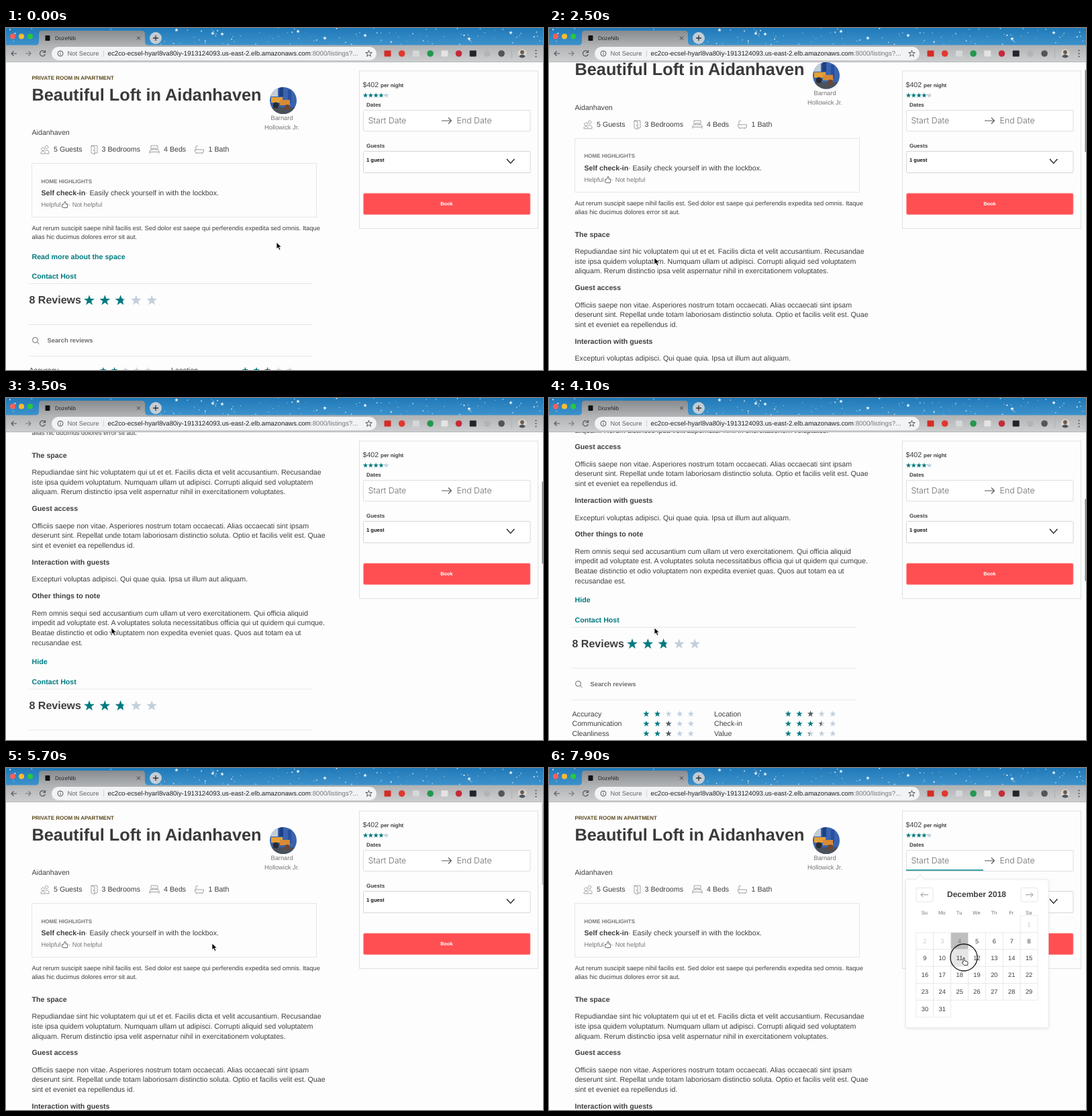
Recreate the animation shown at these times as an HTML page. Size 800 by 509 pixels, loop 8000 ms.

```html
<!DOCTYPE html>
<html lang="en">
<head>
<meta charset="utf-8">
<title>Listing page</title>
<style>
html, body { margin: 0; width: 100%; height: 100%; overflow: hidden; background: #fdfdfd; }
svg { display: block; width: 100%; height: 100%; }
text { font-family: "Liberation Sans", Arial, sans-serif; text-rendering: geometricPrecision; white-space: pre; }
.light { font-family: Inter, "Liberation Sans", sans-serif; font-weight: 300; }
</style>
</head>
<body>
<svg id="stage" viewBox="0 0 800 509"></svg>
<script>
const LOOP = 8000, OPEN_TEXT = 2000, OPEN_CAL = 6700, MORE = 311.7;
const DARK = '#3e3e3e', TEAL = '#007a80', GREY = '#c3cfdb', RULE = '#e4e6e7';

// Text is placed by its optical middle.
const text = (x, y, size, str, fill = DARK, attr = '') =>
  `<text x="${x}" y="${y + size * 0.32}" font-size="${size}" fill="${fill}" ${attr}>${str}</text>`;
const bold = (x, y, size, str, fill = DARK, attr = '') =>
  text(x, y, size, str, fill, 'font-weight="700" ' + attr);
const MID = 'text-anchor="middle"';
const rect = (x, y, w, h, fill, attr = '') =>
  `<rect x="${x}" y="${y}" width="${w}" height="${h}" fill="${fill}" ${attr}/>`;
const circle = (x, y, r, fill, attr = '') =>
  `<circle cx="${x}" cy="${y}" r="${r}" fill="${fill}" ${attr}/>`;
const line = (d, color, width = 1, attr = '') =>
  `<path d="${d}" fill="none" stroke="${color}" stroke-width="${width}" ${attr}/>`;
const rule = y => line(`M34 ${y}H457`, RULE);
const group = (id, body) => `<g id="${id}">${body}</g>`;

function starPath(x, y, r) {
  let d = '';
  for (let i = 0; i < 10; i++) {
    const a = i * Math.PI / 5 - Math.PI / 2, q = i % 2 ? r * 0.4 : r;
    d += (i ? 'L' : 'M') + (x + q * Math.cos(a)).toFixed(2) + ' ' + (y + q * Math.sin(a)).toFixed(2);
  }
  return d + 'Z';
}

let clips = 0;
function stars(x, y, r, step, score, partColor = TEAL) {
  let out = '';
  for (let i = 0; i < 5; i++) {
    const cx = x + i * step, d = starPath(cx, y, r), part = Math.min(1, Math.max(0, score - i));
    out += `<path d="${d}" fill="${part === 1 ? TEAL : GREY}"/>`;
    if (part > 0 && part < 1) {
      const id = 'part' + clips++;
      out += `<clipPath id="${id}">${rect(cx - r, y - r, 2 * r * part, 2 * r, '#000')}</clipPath>` +
        `<path d="${d}" fill="${partColor}" clip-path="url(#${id})"/>`;
    }
  }
  return out;
}

function listing() {
  const icon = d => line(d, '#8b8b8b', 0.8);
  return bold(38.5, 74, 8, 'PRIVATE ROOM IN APARTMENT', '#5c4a1e') +
    bold(38.5, 99.5, 25.3, 'Beautiful Loft in Aidanhaven', '#3a3a3a') +
    '<g clip-path="url(#face)">' +
      rect(393, 88, 40, 40, '#3a64ae') + rect(393, 88, 12, 14, '#c3cdd6') + rect(407, 88, 6, 14, '#1f3f85') +
      rect(420, 92, 5, 20, '#274f9f') + rect(393, 118, 40, 10, '#4b515a') +
      rect(395, 103, 17, 8, '#e6a036') + rect(408, 107, 15, 8, '#d98a35') +
      circle(402, 115, 4.5, '#2a2b30') + circle(419, 118, 4, '#6d4636') +
    '</g>' +
    text(411, 134.5, 9.33, 'Barnard', '#767676', MID) + text(411, 148, 9.33, 'Hollowick Jr.', '#767676', MID) +
    text(38.5, 156, 10.67, 'Aidanhaven') +
    icon('M55 178a2.3 2.3 0 1 0 .1 0M60.5 175a2.3 2.3 0 1 0 .1 0M52 187v-2q3-4 6 0v2zM58.5 187H64v-3q-3-4-6-1') +
    text(71, 181, 10.67, '5 Guests') +
    icon('M127 175h9v11h-4M127 175l5 2v11l-5-2zM130.5 181v2') + text(142.5, 181, 10.67, '3 Bedrooms') +
    icon('M216 181v-6h10v6M214 187v-4l2-2h10l2 2v4M214 184.5h14M218 181v-2h6v2') + text(235, 181, 10.67, '4 Beds') +
    icon('M281.5 181h13v2q0 3-3 3h-7q-3 0-3-3zM283 181v-5q1-2 3 0M284 186v1.5M292 186v1.5') +
    text(301.5, 181, 10.67, '1 Bath') +
    rect(38.5, 201.5, 424, 80, 'none', `stroke="${RULE}"`) +
    bold(52.5, 228, 8, 'HOME HIGHLIGHTS', '#767676') +
    bold(52.5, 245.5, 10.67, 'Self check-in') + text(118, 245.5, 10.67, '· Easily check yourself in with the lockbox.') +
    text(52.5, 263.5, 9.33, 'Helpful', '#767676') +
    line('M83.5 262.5h2l2.5-4.5q1.5.5 1 4h3l-.8 5.5h-5.2l-2.5-1z', '#555', 0.9) +
    text(93, 263.5, 9.33, '· Not helpful', '#767676') +
    text(38.5, 298, 9.33, 'Aut rerum suscipit saepe nihil facilis est. Sed dolor est saepe qui perferendis expedita sed omnis. Itaque') +
    text(38.5, 311, 9.33, 'alias hic ducimus dolores error sit aut.');
}

function details() {
  const sections = [
    [344.5, 'The space',
      'Repudiandae sint hic voluptatem qui ut et et. Facilis dicta et velit accusantium. Recusandae',
      'iste ipsa quidem voluptatum. Numquam ullam ut adipisci. Corrupti aliquid sed voluptatem',
      'aliquam. Rerum distinctio ipsa velit aspernatur nihil in exercitationem voluptates.'],
    [424, 'Guest access',
      'Officiis saepe non vitae. Asperiores nostrum totam occaecati. Alias occaecati sint ipsam',
      'deserunt sint. Repellat unde totam laboriosam distinctio soluta. Optio et facilis velit est. Quae',
      'sint et eveniet ea repellendus id.'],
    [503.7, 'Interaction with guests',
      'Excepturi voluptas adipisci. Qui quae quia. Ipsa ut illum aut aliquam.'],
    [554, 'Other things to note',
      'Rem omnis sequi sed accusantium cum ullam ut vero exercitationem. Qui officia aliquid',
      'impedit ad voluptate est. A voluptates soluta necessitatibus officia qui ut quidem qui cumque.',
      'Beatae distinctio et odio voluptatem non expedita eveniet quas. Quos aut totam ea ut',
      'recusandae est.']
  ];
  return sections.map(([y, title, ...lines]) => bold(38.5, y, 10.67, title) +
    lines.map((s, i) => text(38.5, y + 25.4 + i * 14.6, 10.67, s)).join('')).join('');
}

function reviews() {
  const rating = (x, y, label, score) => text(x, y, 10.67, label) +
    stars(x + 110.4, y, 4.9, 16.6, score, '#5a5f63');
  return bold(38.5, 369.5, 10.67, 'Contact Host', TEAL) + rule(380.5) +
    bold(34.5, 405, 16, '8 Reviews') + stars(124, 405.5, 8.3, 23.3, 2.75) +
    rule(441.5) + circle(43.5, 464.5, 4, 'none', 'stroke="#666"') + line('M46.5 467.5l3 3', '#666') +
    bold(61.5, 465, 9.33, 'Search reviews', '#6f6f6f') + rule(488.5) +
    rating(34.5, 509.5, 'Accuracy', 2) + rating(246, 509.5, 'Location', 2.95) +
    rating(34.5, 524.2, 'Communication', 2.95) + rating(246, 524.2, 'Check-in', 3.5) +
    rating(34.5, 538.8, 'Cleanliness', 2.95) + rating(246, 538.8, 'Value', 2.35);
}

function panel() {
  return rect(526.5, 64, 266, 234.5, '#fdfdfd', 'stroke="#dfe1e2"') +
    text(531.5, 85, 10.67, '$402') + bold(558, 85, 8, 'per night') +
    stars(535.5, 100.3, 4, 7.8, 4.2) +
    bold(537, 114.5, 8, 'Dates') +
    rect(532.5, 122.5, 248.5, 31, '#fff', 'stroke="#dcdfe0" rx="1"') +
    text(539.5, 138.5, 12.4, 'Start Date', '#6c6c6c', 'class="light"') +
    line('M649 138h14.5M659 133.5l4.5 4.5l-4.5 4.5', '#555', 1.1) +
    text(671.5, 138.5, 12.4, 'End Date', '#6c6c6c', 'class="light"') +
    bold(537, 175.5, 8, 'Guests') +
    rect(532.5, 184, 248.5, 32, '#dadada', 'rx="2"') +
    rect(532.5, 183.5, 248.5, 32, '#fff', 'stroke="#d4d6d8" rx="2"') +
    bold(537, 196.5, 7.6, '1 guest', '#111') + line('M746 195l5.7 6.3l5.7-6.3', '#111', 1.2) +
    rect(532.5, 246, 248.5, 31.7, '#ff4f52', 'rx="2" stroke="#ff9b9d" stroke-width=".7"') +
    bold(656.5, 262, 7.4, 'Book', '#fff', MID);
}

const CELL_W = 25.86, CELL_H = 25.2, GRID_X = 547, GRID_Y = 219.7;
const cellPos = day => [GRID_X + (day + 5) % 7 * CELL_W, GRID_Y + Math.floor((day + 5) / 7) * CELL_H];

function calendar() {
  const arrow = (x, dir) => rect(x, 178.5, 25, 20.5, '#fff', 'stroke="#e4e7e7" rx="2"') +
    line(`M${x + 12.5 - dir * 5.5} 188.7h${dir * 11}m${-dir * 3.5} -3.5l${dir * 3.5} 3.5l${-dir * 3.5} 3.5`, '#82888a', 0.9);
  let out = line('M532 152H647', '#008489', 1.6) +
    rect(531.5, 166, 212.5, 220.5, '#fff', 'rx="2" stroke="#e9e9e9" filter="url(#shade)"') +
    '<path d="M546 166.5l7-8l7 8" fill="#fff" stroke="#dedede" stroke-width=".8"/>' +
    arrow(547, -1) + arrow(703, 1) + bold(637, 188, 12, 'December 2018', '#3c3f40', MID);
  ['Su', 'Mo', 'Tu', 'We', 'Th', 'Fr', 'Sa'].forEach((name, i) =>
    out += text(GRID_X + (i + 0.48) * CELL_W, 215.5, 7.6, name, '#757575', MID));
  for (let day = 1; day <= 31; day++) {
    const [x, y] = cellPos(day);
    out += rect(x, y, CELL_W, CELL_H, day === 4 ? '#bebebe' : '#fff', `id="day${day}" stroke="#e4e7e7" stroke-width=".8"`) +
      text(x + CELL_W / 2, y + CELL_H / 2 + 0.3, 9.33, day, day < 4 ? '#c8cacb' : day === 4 ? '#777' : DARK, MID);
  }
  return out;
}

function browser() {
  let seed = 11, sky = '';
  const rnd = () => (seed = seed * 16807 % 2147483647) / 2147483647;
  for (let i = 0; i < 130; i++)
    sky += circle(rnd() * 800, rnd() * 25, 0.35 + rnd() * 0.75, '#fff', `opacity="${0.45 + rnd() * 0.5}"`);
  for (const [x, y] of [[254, 3], [308, 8], [322, 9], [435, 5], [475, 15], [535, 11], [690, 16], [752, 7]])
    sky += `<path d="${starPath(x, y, 3)}" fill="#eef8ff"/>`;
  const nav = d => line(d, '#54585c', 1.2);
  const extensions = ['#d32d27', '#e0382f', '#d5d7d9', '#23984f', '#e3e3e3', '#c52b3a', '#20252b', '#b2b5b7', '#51565b'];
  return rect(0, 0, 800, 26, 'url(#sky)') + sky +
    ['#ff5f57', '#febc2e', '#28c840'].map((c, i) => circle(10 + i * 13, 12.5, 4, c)).join('') +
    '<path d="M43 26q6 0 6-6V9q0-5 5-5H202q5 0 5 5v11q0 6 6 6z" fill="url(#tab)"/>' +
    rect(58.5, 11, 7, 8, '#111', 'rx="1"') + text(73, 15, 8.1, 'DozeNib', '#222') +
    line('M195 12.5l5 5m0-5l-5 5', '#333', 0.9) +
    circle(223, 15, 9, '#c3ccd4') + line('M219 15h8M223 11v8', '#333', 1.3) +
    rect(0, 25.5, 800, 25, 'url(#bar)') + line('M0 50.5H800', '#b4b6b8') +
    nav('M16 38H8m3.5-3.5L8 38l3.5 3.5') +
    line('M29 38h8m-3.5-3.5L37 38l-3.5 3.5', '#777b7f', 1.2) +
    nav('M58 36a4 4 0 1 0 .3 3M58.5 33v3.5H55') +
    rect(68, 28, 484, 20, '#f1f3f4', 'rx="10"') +
    circle(81, 38, 4, 'none', 'stroke="#55595d"') + line('M81 37.3v3M81 35.2v1', '#55595d') +
    text(91.5, 38, 9.4, 'Not Secure', '#5f6368') + line('M145.5 33v10', '#c9cccf', 0.8) +
    text(151.5, 38, 9.75, 'ec2co-ecsel-hyarl8va80iy-1913124093.us-east-2.elb.amazonaws.com<tspan fill="#74787c">:8000/listings?...</tspan>', '#222') +
    `<path d="${starPath(540.5, 38.2, 5)}" fill="none" stroke="#55595d"/>` +
    extensions.map((c, i) => i % 2 || i === 8
      ? circle(568.5 + i * 21.2, 38, 4.8, c) : rect(563.5 + i * 21.2, 33.5, 10, 9, c, 'rx="1"')).join('') +
    line('M753.5 31v14', '#a9acaf', 0.8) +
    '<g clip-path="url(#me)">' + rect(762, 31, 14, 14, '#d8d6cf') + circle(769, 36, 2.9, '#6d5a50') +
      circle(769, 45, 5.5, '#4c5560') + '</g>' +
    [33.5, 38, 42.5].map(y => circle(789.5, y, 1.1, '#54585c')).join('');
}

const gradient = (id, a, b) => `<linearGradient id="${id}" x2="0" y2="1"><stop stop-color="${a}"/><stop offset="1" stop-color="${b}"/></linearGradient>`;
document.getElementById('stage').innerHTML = '<defs>' +
  gradient('sky', '#2079b8', '#3c92cb') + gradient('tab', '#878b8f', '#b0b2b4') + gradient('bar', '#b0b2b4', '#cdcfd0') +
  `<clipPath id="face">${circle(413, 108, 20, '#000')}</clipPath><clipPath id="me">${circle(769, 38, 6.5, '#000')}</clipPath>` +
  '<filter id="shade" x="-10%" y="-10%" width="120%" height="120%"><feDropShadow dx="0" dy="1" stdDeviation="2" flood-opacity=".09"/></filter></defs>' +
  rect(0, 0, 800, 509, '#fdfdfd') +
  group('page', listing() + group('more', bold(38.5, 340.5, 10.67, 'Read more about the space', TEAL)) +
    group('details', details() + bold(38.5, 652, 10.67, 'Hide', TEAL)) + group('reviews', reviews())) +
  panel() + group('calendar', calendar()) +
  rect(798.5, 51, 1.5, 122, '#828282', 'id="thumb"') + browser() +
  group('cursor', circle(0, 0, 20, 'none', 'id="ring" stroke="#111" stroke-width="1.3"') +
    '<path id="arrow" d="M0 0v9.8l2.3-2.2l1.7 3.9l1.9-.8l-1.7-3.8h3.2z" fill="#000" stroke="#fff" stroke-width=".8"/>' +
    '<path id="hand" d="M-1 1q1-1.5 2 0v4l4 1q1.5.5 1 3l-.7 2.500H.5L-2.5 8q0-1.500 1.500-.8z" fill="#fff" stroke="#111" stroke-width=".8"/>');

const el = id => document.getElementById(id);
const show = (id, on) => el(id).setAttribute('visibility', on ? 'visible' : 'hidden');
const clamp = v => Math.min(1, Math.max(0, v));

const pointer = [[300, 403, 319], [1350, 162, 346], [1800, 157, 342], [5300, 157, 342], [5700, 307, 261],
  [6450, 590, 141], [6900, 590, 141], [7450, 612, 257], [7800, 618, 282]];
const scrolling = [[2300, 0], [2900, 142], [3150, 142], [3800, 351], [4300, 351], [5174, 0]];
const clicks = [[1850, 2050], [6550, 6750], [7700, LOOP]];

function track(keys, t) {
  const i = keys.findIndex(k => k[0] > t);
  if (i < 0) return keys[keys.length - 1].slice(1);
  if (i === 0) return keys[0].slice(1);
  const a = keys[i - 1], b = keys[i], u = (t - a[0]) / (b[0] - a[0]), s = u * u * (3 - 2 * u);
  return a.slice(1).map((v, j) => v + (b[j + 1] - v) * s);
}

function draw(t) {
  const [x, y] = track(pointer, t), [scroll] = track(scrolling, t);
  const open = t >= OPEN_TEXT, cal = t >= OPEN_CAL;
  el('page').setAttribute('transform', `translate(0 ${-scroll})`);
  show('more', !open);
  show('details', open);
  el('reviews').setAttribute('transform', `translate(0 ${open ? MORE : 0})`);
  show('calendar', cal);
  el('thumb').setAttribute('transform', `translate(0 ${1 + scroll * 0.28})`);
  el('thumb').setAttribute('opacity', clamp((t - 2250) / 100) * clamp((5900 - t) / 400));

  const inCell = day => {
    const [cx, cy] = cellPos(day);
    return x >= cx && x < cx + CELL_W && y >= cy && y < cy + CELL_H;
  };
  for (let day = 5; day <= 31; day++) el('day' + day).setAttribute('fill', inCell(day) ? '#e6e6e6' : '#fff');

  const hand = t > 1750 && t < OPEN_TEXT || cal && y > GRID_Y;
  el('cursor').setAttribute('transform', `translate(${x} ${y})`);
  show('hand', hand);
  show('arrow', !hand);
  show('ring', clicks.some(([from, to]) => t >= from && t < to));
}

const start = performance.now();
(function frame() {
  draw((performance.now() - start) % LOOP);
  requestAnimationFrame(frame);
})();
</script>
</body>
</html>
```
